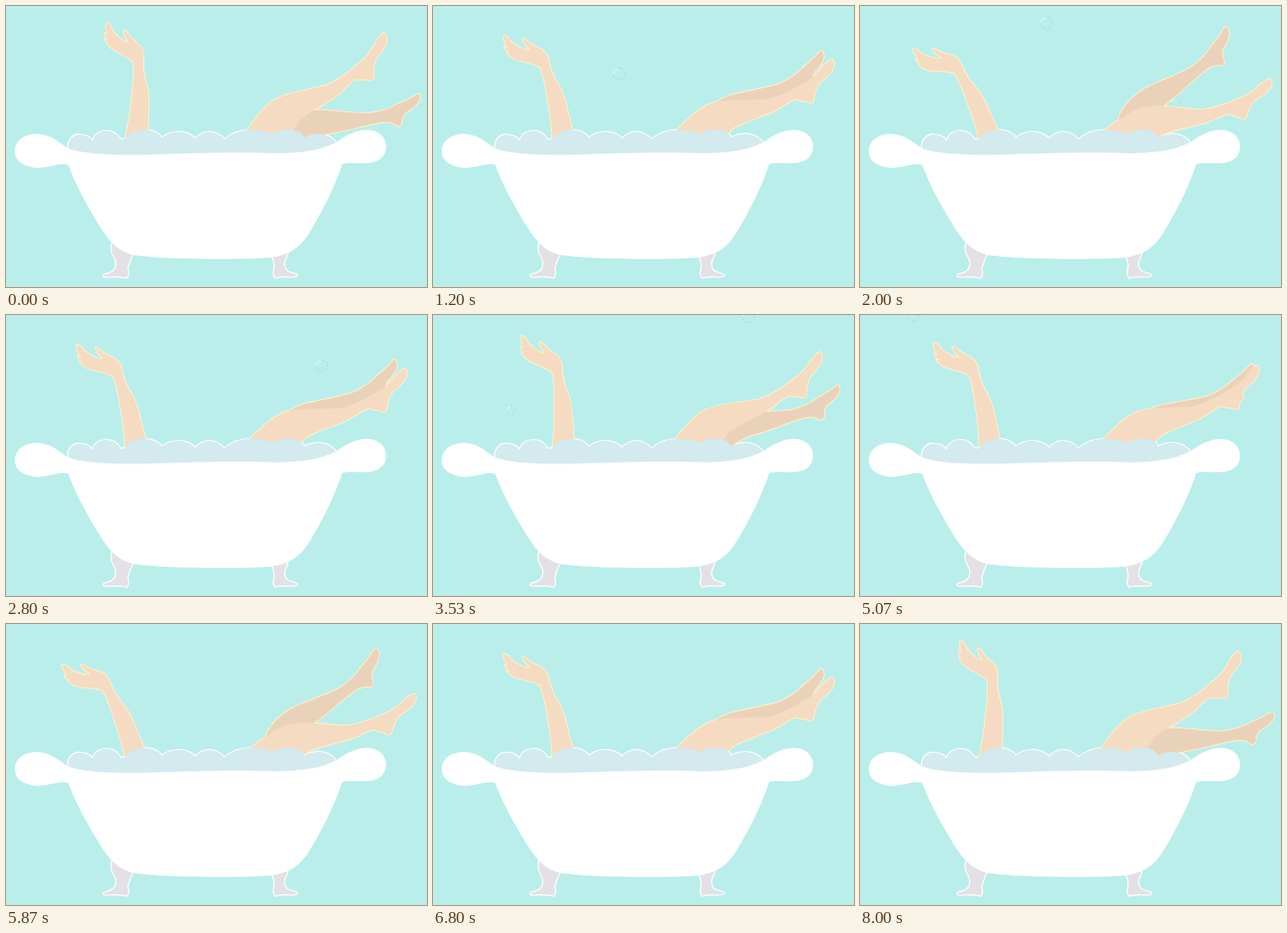
These frames come from a looping animation (432x288 px, 8070 ms). An HTML page:

```html
<!DOCTYPE html>
<html lang="en">
<head>
<meta charset="utf-8">
<title>Bubble bath</title>
<style>
  html, body { margin: 0; width: 100%; height: 100%; overflow: hidden; background: #b9eeeb; }
  svg { display: block; width: 100vw; height: 100vh; }
  .skin { fill: #f4dbc2; }
  .shade { fill: #ead2ba; }
  .rim { fill: none; stroke: #fff1c9; stroke-width: 2; stroke-linejoin: round; }
  .foot { fill: #e3e1e5; stroke: #fff; stroke-width: 1.2; stroke-linejoin: round; }
  .bubble { fill: none; stroke-width: .8; }
</style>
</head>
<body>
<svg viewBox="0 0 432 288">
  <defs>
    <path id="foam" d="M64 147C62 138 69 131 76 132Q84 132 89 138C91 131 97 128 103 128Q112 128 118 137Q122 137 123 135C130 128 136 127 142 127Q154 127 160 135C166 130 172 129 178 129Q189 130 194 136C199 131 204 129 209 129Q219 130 224 137C232 130 241 127 251 127Q265 127 274 131C280 127 286 126 292 127Q303 127 306 135C311 132 316 131 322 131Q332 132 338 139L345 160H64Z"/>
    <path id="arm" d="M119 150L123 134Q128 112 129.500 90Q132 72 131 58C125 51 114 48 107 42Q102 37 102 34Q104 35 106 37Q101 32 101 28L104 30Q102 22 103 17Q106 17 108 22C109 27 114 30 118 34Q122 38 126 37Q120 29 121 25Q123 25 126 30Q129 34 134 38Q141 43 141 51C140 62 141 70 144 80Q147 91 146 105L145 150Z"/>
    <path id="nearLeg" d="M232 152Q244 132 252 121Q264 104 274 97C289 88 312 86 330 81Q347 73 362 59Q373 50 377 42Q383 30 388 28Q392 30 390 39Q386 47 380 53Q376 62 377 74Q375 77 370 75Q364 76 359 75C352 79 346 87 339 92C326 101 312 108 302 117Q291 129 286 152Z"/>
    <path id="farLeg" d="M262 152Q274 127 287 117Q299 108 320 106.500C336 107 355 110 372 110Q389 108 401 101Q412 97 423 90Q426 91 424 97Q420 104 410 109Q406 113 406 120Q404 125 400 122Q395 118 386 119C367 122 350 128 335 130Q308 134 296 152Z"/>
  </defs>
  <rect width="432" height="288" fill="#b9eeeb"/>
  <use href="#foam" fill="none" stroke="#fff" stroke-width="2.2"/>
  <g id="bubbles"></g>
  <g data-limb="arm"><use href="#arm" class="rim"/><use href="#arm" class="skin"/></g>
  <g data-limb="far"><use href="#farLeg" class="rim"/></g>
  <g data-limb="near"><use href="#nearLeg" class="rim"/></g>
  <g data-limb="far"><use href="#farLeg" class="shade"/></g>
  <g data-limb="near"><use href="#nearLeg" class="skin"/></g>
  <use href="#foam" fill="#d3eaee"/>
  <path class="foot" d="M109 241Q106 250 110 256Q114 262 112 268Q110 273 100 275Q98 278 104 278Q115 277 124 279Q127 276 125 269Q127 260 132 252Z"/>
  <path class="foot" d="M271 254Q276 262 275 269Q273 275 276 279Q284 277 293 278Q300 278 299 275L290 272Q285 269 286 262Q290 255 290 247Z"/>
  <path fill="#fff" d="M9 149C9 137 20 131 32 131C48 132 54 140 64 146C80 152 110 153 140 152.500C180 151 240 149 280 151C310 150 325 147 340 139C352 130 362 127 370 127C382 127 390 134 390 144C390 156 380 161 369 161C360 162 352 160 345 162C337 187 323 213 311 233C302 248 289 256 270 258C240 260 160 260 130 255C112 250 104 238 95 224C82 202 72 185 64 163C57 160 48 165 33 166C18 165 9 159 9 149Z"/>
</svg>
<script>
const LOOP = 8070;
const FPS = 15;
const SWING = 30; // steps from one extreme to the other

const limbs = {
  arm: { angle: -25.7, pivot: "139 137" },
  near: { angle: 18.9, pivot: "263 151" },
  far: { angle: -28.3, pivot: "263 152" }
};

const bubbles = [
  { start: -50, x: 191, drift: 0 },
  { start: 1270, x: 324, drift: 0 },
  { start: 2780, x: 88, drift: -36 }
];
const RISE = 2400;

const bubbleLayer = document.getElementById("bubbles");
for (const bubble of bubbles) {
  bubble.node = document.createElementNS("http://www.w3.org/2000/svg", "g");
  bubble.node.innerHTML =
    '<circle class="bubble" r="6" stroke="#8fc5c6" stroke-dasharray="1 2"/>' +
    '<path class="bubble" d="M-6 0A6 6 0 0 1-3-5M-2-6V-3" stroke="#fff"/>';
  bubbleLayer.append(bubble.node);
}

function draw(ms) {
  const step = Math.floor(((ms % LOOP) + 5) * FPS / 1000);
  const time = step * 1000 / FPS;
  const phase = step % (2 * SWING);
  const swing = 1 - Math.abs(phase / SWING - 1);

  for (const node of document.querySelectorAll("[data-limb]")) {
    const { angle, pivot } = limbs[node.dataset.limb];
    node.setAttribute("transform", `rotate(${angle * swing} ${pivot})`);
  }

  for (const { node, start, x, drift } of bubbles) {
    const age = (time - start) / RISE;
    const visible = age > 0 && age < 1;
    node.style.display = visible ? "" : "none";
    if (!visible) continue;
    const climb = age ** 1.3;
    const size = Math.min(1, 0.25 + age * 1.6);
    node.setAttribute("transform",
      `translate(${x + drift * climb} ${128 - 136 * climb}) scale(${size})`);
  }
}

const origin = performance.now();
function tick() {
  draw(performance.now() - origin);
  requestAnimationFrame(tick);
}
tick();
</script>
</body>
</html>
```
